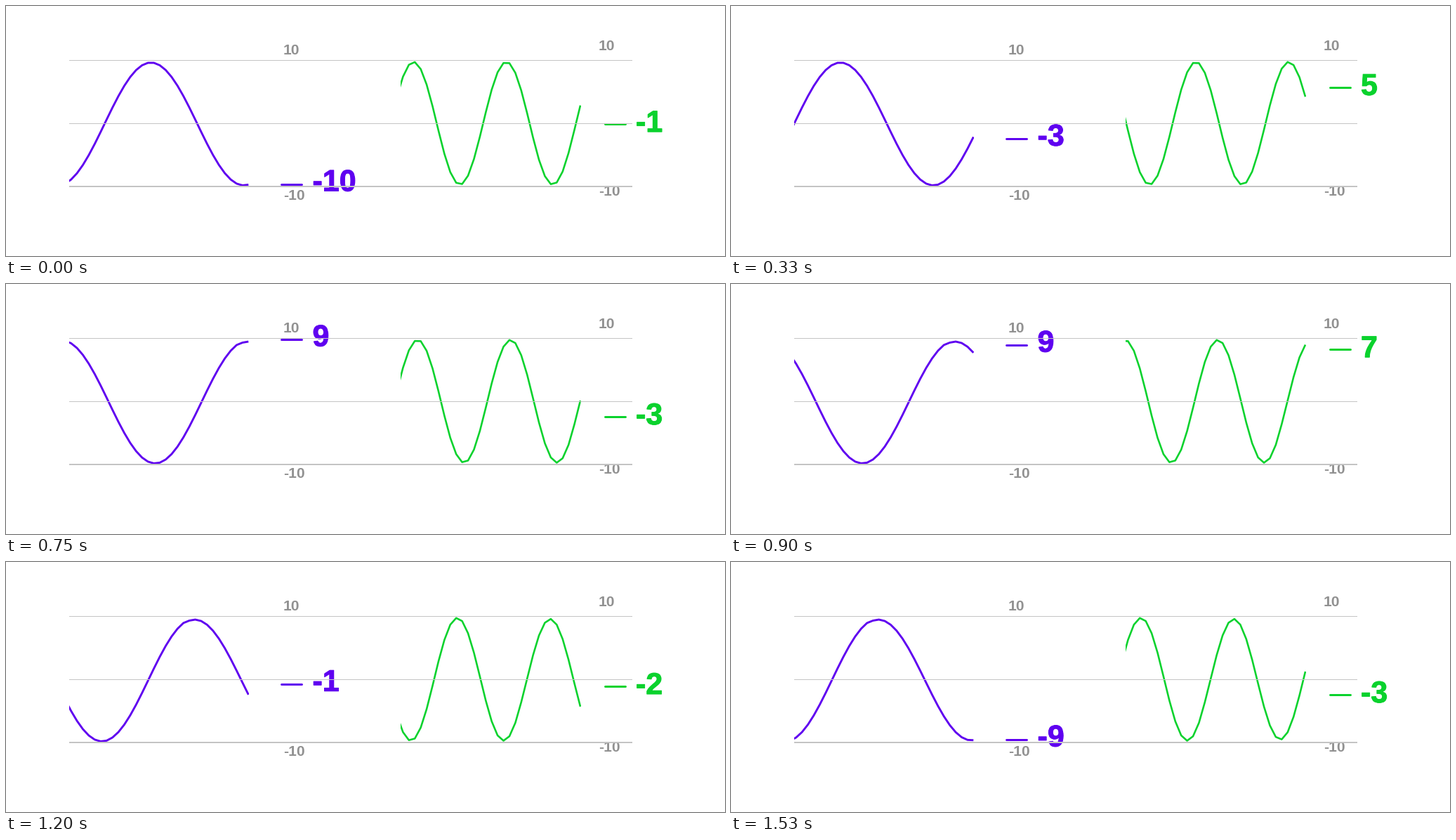
Recreate the animation shown at these times as a matplotlib script. Size 1024 px wide and 356 px high, loop 1560 ms.

```python
import numpy as np
import matplotlib.pyplot as plt
from matplotlib.animation import FuncAnimation
from matplotlib.patches import Rectangle
from matplotlib.patheffects import withStroke

W, H, DPI = 1024, 356, 100
PX = 72 / DPI                      # points per pixel
FRAMES, INTERVAL = 52, 30
LOOP = FRAMES * INTERVAL
STEP_X = 8.42                      # distance between samples
STEP_MS = LOOP / (10 * np.pi)      # time between samples
SWING = 88                         # travel of the marker around its centre

fig = plt.figure(figsize=(W / DPI, H / DPI), dpi=DPI, facecolor="white")
ax = fig.add_axes([0, 0, 1, 1])
ax.set(xlim=(0, W), ylim=(H, 0))
ax.axis("off")


def label(x, baseline, text, size, color, zorder=2):
    return ax.text(x, baseline, text, fontsize=size * PX, color=color,
                   family="Liberation Sans", weight="bold",
                   ha="left", va="baseline", zorder=zorder)


class Chart:
    """A scrolling sampled sine with a marker that follows its newest value."""

    def __init__(self, color, width, left, right, peak, mid, cycles,
                 marker_x, marker_mid, start, text_dy):
        self.right, self.peak, self.mid, self.cycles = right, peak, mid, cycles
        self.marker_x, self.marker_mid = marker_x, marker_mid
        self.start, self.text_dy = np.radians(start), text_dy
        self.line, = ax.plot([], [], color=color, lw=width * PX, zorder=3,
                             solid_joinstyle="round", solid_capstyle="butt")
        self.line.set_clip_path(Rectangle((left, 0), right + 0.6 - left, H,
                                          transform=ax.transData))
        self.dash, = ax.plot([], [], color=color, lw=3 * PX, zorder=3,
                             solid_capstyle="round")
        self.text = label(marker_x + 44.5, 0, "", 43, color, 3)
        self.text.set_path_effects([withStroke(linewidth=PX, foreground=color)])

    def update(self, t):
        age = np.arange(31, -1, -1)
        step = int((t + 12) // STEP_MS)
        x = self.right - STEP_X * age
        phase = 0.2 * self.cycles * (step + (x - self.peak) / STEP_X)
        # samples that arrive late in the loop are slightly lower
        amp = np.where(step - age > 13, 86.0, 87.5)
        self.line.set_data(x, self.mid - amp * np.cos(phase))

        level = np.cos(2 * np.pi * self.cycles * t / LOOP + self.start)
        y = self.marker_mid - SWING * level
        self.dash.set_data([self.marker_x, self.marker_x + 29], [y, y])
        self.text.set_text(str(round(float(9.55 * level))))
        self.text.set_y(y + self.text_dy)
        return self.line, self.dash, self.text


for y, height in ((77, 1), (167, 1), (256, 2)):
    ax.add_patch(Rectangle((89.5, y), 802.5, height, color="#c4c4c4", lw=0,
                           antialiased=False, zorder=5))
for x, top, bottom in ((395, 69, 276), (844, 63, 270)):
    label(x, top, "10", 21, "#919191")
    label(x, bottom, "-10", 21, "#919191")

charts = [
    Chart("#5f00f0", 2.9, left=89.5, right=345.3, peak=206.4, mid=168,
          cycles=1, marker_x=392, marker_mid=166, start=178.5, text_dy=9.5),
    Chart("#0ad22d", 2.6, left=562, right=818, peak=712.6, mid=167,
          cycles=2, marker_x=852.5, marker_mid=162, start=266, text_dy=11),
]


def draw(frame):
    t = frame * INTERVAL
    return [artist for chart in charts for artist in chart.update(t)]


anim = FuncAnimation(fig, draw, frames=FRAMES, interval=INTERVAL,
                     repeat=True, repeat_delay=0, blit=False)
plt.show()
```
